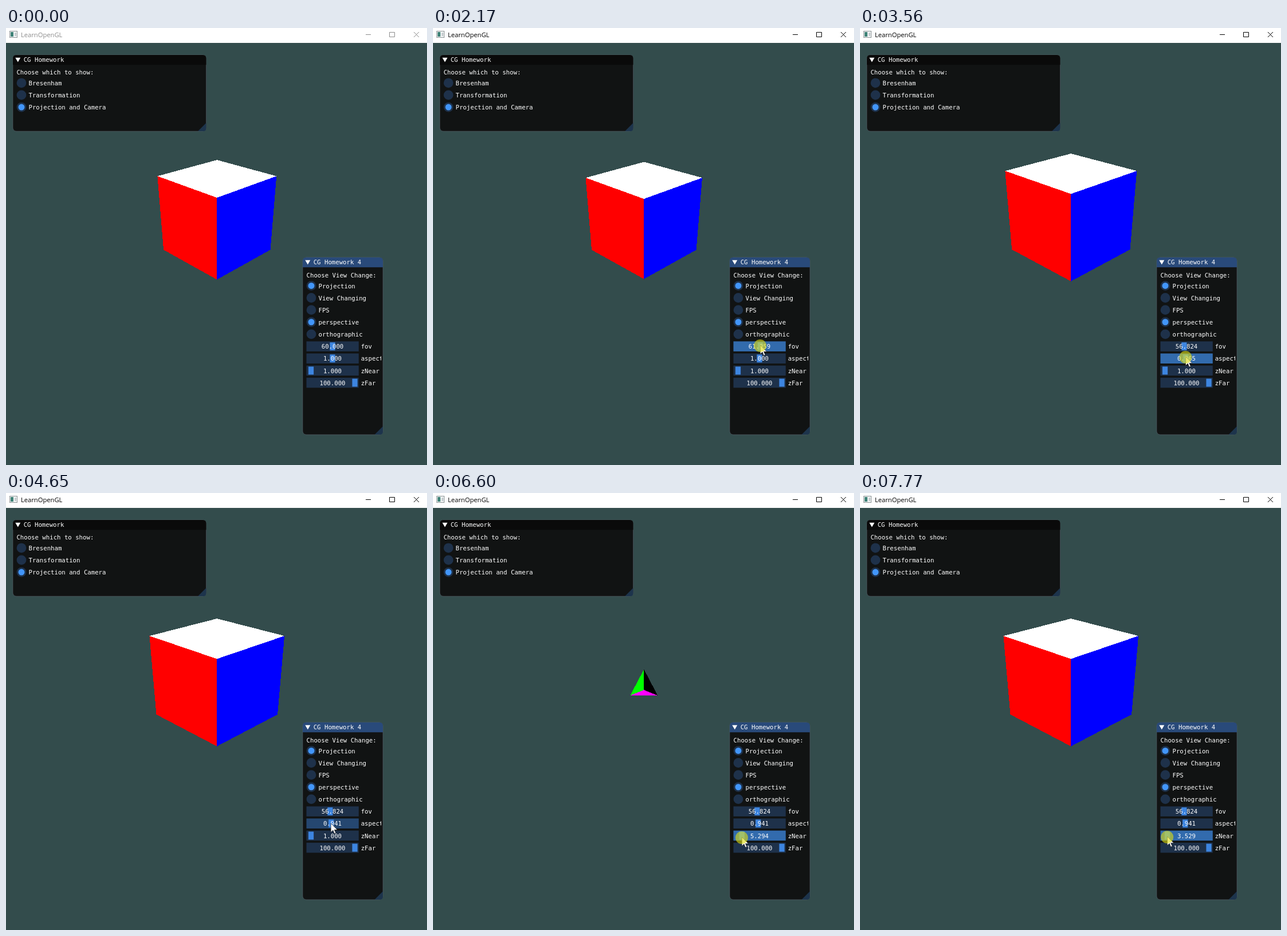
Recreate the animation shown at these times as an HTML page. Size 735 px wide and 762 px high, loop 7850 ms.

```html
<!DOCTYPE html>
<html lang="en">
<head>
<meta charset="utf-8">
<title>LearnOpenGL</title>
<style>
  html, body { margin: 0; width: 100%; height: 100%; overflow: hidden; background: #334c4c; }
  svg { display: block; width: 100vw; height: 100vh; }
  text { white-space: pre; }
  .ui text { font: 10.68px "DejaVu Sans Mono", monospace; fill: #fff; }
  .caption { font: 11.2px "Open Sans", "Noto Sans", sans-serif; }
  .panel { fill: #111313; stroke: #6e6e80; stroke-opacity: .4; }
  .grip { fill: #1d344c; }
  .frame { fill: #1e314a; }
  .frame.hover { fill: #254770; }
  .frame.active { fill: #326bad; }
  .knob { fill: #3d85e0; }
  .active + .knob, .dot { fill: #4296fa; }
  .value { text-anchor: middle; }
  #bar { color: #000; }
  #bar.idle { color: #8c8c8c; }
  #cube { shape-rendering: crispEdges; }
</style>
</head>
<body>
<svg viewBox="0 0 735 762" preserveAspectRatio="none">
  <defs>
    <clipPath id="inner"><rect x="518" y="400" width="137" height="309"/></clipPath>
  </defs>
  <rect width="735" height="762" fill="#334c4c"/>
  <g id="cube"></g>

  <g id="bar" class="idle">
    <rect width="735" height="26" fill="#fff"/>
    <rect x="6.5" y="5.5" width="13" height="11" fill="#f4f6f6" stroke="#8a9294"/>
    <rect x="8" y="7" width="5" height="8" fill="#3f8277"/>
    <rect x="15" y="8" width="3" height="6" fill="#c5cccf"/>
    <text class="caption" x="26" y="16" fill="currentColor">LearnOpenGL</text>
    <path d="M628 11.5h9M669.5 7.5h9v8h-9zM712 7l9 9m0-9l-9 9" fill="none" stroke="currentColor"/>
  </g>

  <g id="ui" class="ui"></g>

  <g id="pointer">
    <path d="M0 0V15.5L3.7 12.1L6.2 18L8.6 17L6.1 11.3H11.2Z" fill="#fff" stroke="#222" stroke-width=".6"/>
    <circle id="press" cx="-.3" cy="1" r="11" fill="#dcdc14" fill-opacity=".62"/>
  </g>
</svg>

<script>
const LOOP = 7850, FOCUS_AT = 1150;
const CELL = 0.918;      // screen pixels per slider step
const STEPS = 85;        // steps along a slider
const TRACK_X = 531;     // knob centre at the low end
const $ = id => document.getElementById(id);

// ---- panels -------------------------------------------------------------
const label = (x, y, text, cls = '') => `<text class="${cls}" x="${x}" y="${y}">${text}</text>`;

function panel(x, y, w, h, title, titleFill) {
  const r = x + w, b = y + h;
  return `<rect class="panel" x="${x}" y="${y}" width="${w}" height="${h}" rx="6"/>
    <path fill="${titleFill}" d="M${x} ${y + 17.3}v-11.3q0 -6 6 -6h${w - 12}q6 0 6 6v11.3z"/>
    <path fill="#fff" d="M${x + 4.3} ${y + 4.8}h9l-4.5 7.8z"/>
    <path class="grip" d="M${r} ${b - 14.5}v9q0 5.5 -5.5 5.5h-9z"/>
    ${label(x + 18.7, y + 12.3, title)}`;
}

function radio(x, y, text, on) {
  return `<circle class="frame" cx="${x}" cy="${y}" r="8.4"/>
    ${on ? `<circle class="dot" cx="${x}" cy="${y}" r="5.5"/>` : ''}
    ${label(x + 12.5, y + 4.2, text)}`;
}

const radios = (x, y, items) =>
  items.map(([text, on], i) => radio(x, y + i * 21.12, text, on)).join('');

// Drags are [time, step] pairs.
const sliders = [
  { name: 'fov', min: 30, max: 90, start: 60, release: 2560, drags: [
    [1150, 49], [1380, 51], [1460, 52], [1700, 50], [1780, 48], [1850, 47],
    [2170, 44], [2250, 41], [2330, 39], [2410, 38]] },
  { name: 'aspect', min: 0, max: 2, start: 1, release: 4650, drags: [
    [3090, 43], [3240, 44], [3320, 43], [3560, 41], [3710, 40], [3870, 39], [3950, 40]] },
  { name: 'zNear', min: 0, max: 50, start: 1, release: LOOP, drags: [
    [5350, 5], [5730, 6], [5900, 7], [6600, 9], [6830, 10], [7150, 9], [7300, 8], [7770, 6]] },
  { name: 'zFar', min: 0, max: 100, start: 100, release: 0, drags: [] },
];
sliders.forEach((s, i) => s.y = 546.4 + i * 21.12);

const sliderMarkup = s => `<g id="${s.name}">
  <rect class="frame" x="524.5" y="${s.y}" width="91.3" height="17.5"/>
  <rect class="knob" y="${s.y + 1.8}" width="9.2" height="13.9"/>
  ${label(570, s.y + 12.9, '', 'value')}</g>
  ${label(619.7, s.y + 12.9, s.name)}`;

$('ui').innerHTML =
  panel(12, 47, 337.5, 133, 'CG Homework', '#0a0a0a') +
  label(18.4, 81.3, 'Choose which to show:') +
  radios(27, 95.8, [['Bresenham'], ['Transformation'], ['Projection and Camera', true]]) +
  panel(518, 400, 140, 309, 'CG Homework 4', '#294a7a') +
  label(524.6, 434.6, 'Choose View Change:') +
  radios(533, 449.4, [['Projection', true], ['View Changing'], ['FPS'],
    ['perspective', true], ['orthographic']]) +
  `<g clip-path="url(#inner)">${sliders.map(sliderMarkup).join('')}</g>`;

for (const s of sliders) [s.frame, s.knob, s.text] = $(s.name).children;

// ---- pointer path: [time, x, y], held until the next entry ---------------
function glide(t0, t1, count, [x0, y0], [x1, y1], ease = k => k) {
  return Array.from({ length: count }, (_, i) => {
    const k = i / (count - 1), e = ease(k);
    return [t0 + (t1 - t0) * k, x0 + (x1 - x0) * e, y0 + (y1 - y0) * e];
  });
}

const dragPath = (s, height) =>
  s.drags.map(([t, n]) => [t, TRACK_X + n * CELL, height(t)]);

const path = [
  ...glide(70, 540, 7, [629, 711], [576, 552], k => 1 - (1 - k) ** 1.6),
  ...dragPath(sliders[0], t => t < 1300 ? 552 : t < 2000 ? 551 : 553),
  [2560, 567, 556], [2640, 572, 565], [2710, 572, 568], [2790, 571, 571], [2860, 570.5, 572],
  ...dragPath(sliders[1], t => t < 3800 ? 573 : 576),
  ...glide(4650, 5030, 6, [567.2, 576], [535.6, 600]),
  ...dragPath(sliders[2], t => t < 6700 ? 600 : 599),
];

const lastBefore = (list, t) => list.findLast(e => e[0] <= t + 0.01);

// ---- cube ---------------------------------------------------------------
const CENTER = [368.3, 394], HALF = 368;
const PITCH = 29.7 * Math.PI / 180, EYE_HEIGHT = 0.489, EYE_DISTANCE = 4.585;
const SIN = Math.sin(PITCH), COS = Math.cos(PITCH);

// Corner (a, b, h) of the unit cube, seen along its diagonal.
function toView([a, b, h]) {
  const side = (a - b) / Math.SQRT2, away = (a + b) / Math.SQRT2;
  return [side, EYE_HEIGHT + h * COS + away * SIN, EYE_DISTANCE - h * SIN + away * COS];
}

function face(axis, sign, color) {
  const corners = [[-1, -1], [1, -1], [1, 1], [-1, 1]].map(([u, v]) => {
    const p = [u / 2, v / 2];
    p.splice(axis, 0, sign / 2);
    return toView(p);
  });
  return { corners, color };
}

// Inner faces first, then the three that face the viewer.
const faces = [
  face(2, -1, '#f0f'), face(1, 1, '#0f0'), face(0, 1, '#000'),
  face(0, -1, '#f00'), face(1, -1, '#00f'), face(2, 1, '#fff'),
];
$('cube').innerHTML = faces.map(f => `<polygon fill="${f.color}"/>`).join('');

function clipNear(points, near) {
  return points.flatMap((p, i) => {
    const q = points[(i + 1) % points.length];
    const out = p[2] >= near ? [p] : [];
    if ((p[2] >= near) !== (q[2] >= near)) {
      const k = (near - p[2]) / (q[2] - p[2]);
      out.push(p.map((v, j) => v + (q[j] - v) * k));
    }
    return out;
  });
}

function drawCube(fov, aspect, near) {
  const focal = HALF / Math.tan(fov * Math.PI / 360);
  faces.forEach((f, i) => {
    const points = clipNear(f.corners, near).map(([x, y, z]) =>
      `${(CENTER[0] + x * focal / aspect / z).toFixed(2)},${(CENTER[1] - y * focal / z).toFixed(2)}`);
    $('cube').children[i].setAttribute('points', points.join(' '));
  });
}

// ---- playback -----------------------------------------------------------
function render(t) {
  const at = lastBefore(path, t);
  let pressed = false;

  const values = sliders.map(s => {
    const drag = lastBefore(s.drags, t);
    const value = drag ? s.min + (s.max - s.min) * drag[1] / STEPS : s.start;
    const active = Boolean(drag) && t < s.release;
    const hover = t >= FOCUS_AT && at && at[2] >= s.y && at[2] <= s.y + 17.5;
    pressed ||= active;
    s.frame.setAttribute('class', 'frame' + (active ? ' active' : hover ? ' hover' : ''));
    const share = (value - s.min) / (s.max - s.min);
    s.knob.setAttribute('x', TRACK_X - 4.6 + share * STEPS * CELL);
    s.text.textContent = value.toFixed(3);
    return value;
  });

  drawCube(...values);
  $('bar').classList.toggle('idle', t < FOCUS_AT);
  $('pointer').style.display = at ? '' : 'none';
  if (at) $('pointer').setAttribute('transform', `translate(${at[1]} ${at[2]})`);
  $('press').style.display = pressed ? '' : 'none';
}

function tick() {
  render(performance.now() % LOOP);
  requestAnimationFrame(tick);
}
tick();
</script>
</body>
</html>
```
